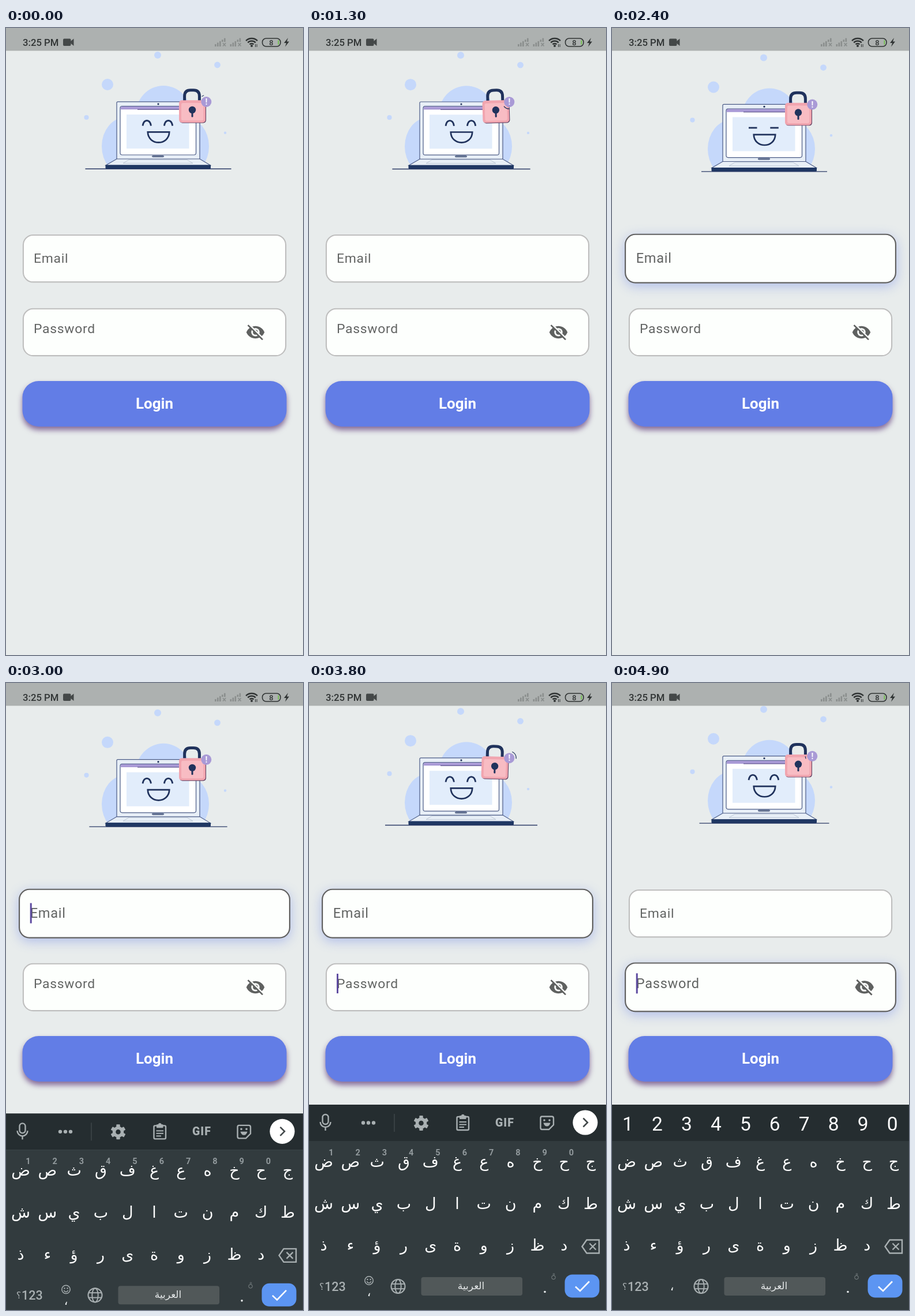
Write an HTML page with a canvas that moves like this. It is 515 px wide and 1087 px high and loops after 5 s.

```html
<!DOCTYPE html>
<html lang="en">
<head>
<meta charset="utf-8">
<title>Login</title>
<style>
html, body { margin: 0; width: 100%; height: 100%; overflow: hidden; background: #e8ecec; }
canvas { display: block; }
</style>
</head>
<body>
<canvas id="stage" width="515" height="1087"></canvas>
<script>
const ctx = document.getElementById('stage').getContext('2d');
const LOOP = 5000, TAU = Math.PI * 2;
const NAVY = '#20325c', BLUE = '#c5d8fb', LILAC = '#a99ad6', INK = '#303434', KEY = '#a9b0b2';
const ROBOTO = 'Roboto, sans-serif', ARABIC = '"DejaVu Sans", sans-serif';

const clamp = (v, a = 0, b = 1) => Math.min(b, Math.max(a, v));
const mix = (a, b, p) => a + (b - a) * p;

function paint(fill, stroke, width = 1) {
  if (fill) { ctx.fillStyle = fill; ctx.fill(); }
  if (stroke) { ctx.strokeStyle = stroke; ctx.lineWidth = width; ctx.stroke(); }
}
function box(x, y, w, h, r, fill, stroke, width) {
  ctx.beginPath();
  ctx.roundRect(x, y, w, h, r);
  paint(fill, stroke, width);
}
function oval(x, y, rx, ry, fill, stroke, width) {
  ctx.beginPath();
  ctx.ellipse(x, y, rx, ry, 0, 0, TAU);
  paint(fill, stroke, width);
}
const dot = (x, y, r, fill, stroke, width) => oval(x, y, r, r, fill, stroke, width);
function arc(x, y, r, from, to, color, width) {
  ctx.beginPath();
  ctx.arc(x, y, r, from, to);
  paint(null, color, width);
}
function poly(points, fill, stroke, width, closed = true) {
  ctx.beginPath();
  for (let i = 0; i < points.length; i += 2) ctx.lineTo(points[i], points[i + 1]);
  if (closed) ctx.closePath();
  paint(fill, stroke, width);
}
const line = (points, color, width) => poly(points, null, color, width, false);
function shape(d, fill, stroke, width) {
  const path = new Path2D(d);
  if (fill) { ctx.fillStyle = fill; ctx.fill(path); }
  if (stroke) { ctx.strokeStyle = stroke; ctx.lineWidth = width; ctx.stroke(path); }
}
function text(s, x, y, font, color, align = 'center', spacing = 0) {
  ctx.font = font;
  ctx.fillStyle = color;
  ctx.textAlign = align;
  ctx.letterSpacing = spacing + 'px';
  ctx.fillText(s, x, y);
}
function at(x, y, draw) {
  ctx.save();
  ctx.translate(x, y);
  draw();
  ctx.restore();
}
function shadow(color, blur, y) {
  ctx.shadowColor = color;
  ctx.shadowBlur = blur;
  ctx.shadowOffsetY = y;
}

function signal(x) {
  const gray = '#8a8e8d';
  for (let i = 0; i < 5; i++) {
    const h = 4 + i * 2.6, cut = i > 2 ? 8 : 0;
    box(x + i * 4, 32 - h, 2.6, h - Math.min(cut, h), 0, gray);
  }
  line([x + 14, 26, x + 19, 31.5], gray, 1.8);
  line([x + 19, 26, x + 14, 31.5], gray, 1.8);
}

function statusBar() {
  box(0, 0, 515, 39.5, 0, '#adb1b0');
  text('3:25 PM', 29, 31, '500 16.7px ' + ROBOTO, INK, 'left');
  box(99, 18.5, 13.5, 12.5, 2, '#444848');
  poly([112, 23, 117.5, 18.5, 117.5, 31, 112, 26.5], '#444848');
  signal(362);
  signal(388.5);
  for (const r of [5, 9.5, 14]) arc(426, 32, r, -TAU * 0.375, -TAU * 0.125, INK, 2.5);
  dot(426, 31, 2, INK);
  line([432.5, 28, 432.5, 33], INK, 1);
  line([435, 28, 435, 33], INK, 1);
  box(444.5, 18, 31.5, 14, 6.5, null, INK, 1.6);
  box(471.5, 21, 1.8, 8, 0.9, '#6fc04a');
  text('8', 460, 29.8, '500 13px ' + ROBOTO, INK);
  poly([489, 17, 482, 26, 486, 26, 484, 32.5, 491, 23.5, 487, 23.5], INK);
}

function eye(x, k) {
  const top = 168.5 - 16 * k;
  shape(`M${x} ${168.5 + k} C${x + 2} ${top + 5 * k} ${x + 12.5} ${top + 5 * k} ${x + 14.5} ${168.5 + k}`, null, NAVY, 2.8);
}

function laptop(m) {
  ctx.save();
  ctx.beginPath();
  ctx.rect(120, 90, 280, 150);
  ctx.clip();
  oval(273, 150, 48, 50, BLUE);
  oval(207, 205, 41, 50, BLUE);
  oval(312, 205, 40, 49, BLUE);
  ctx.restore();

  const edge = '#4b5b86', shell = '#e8eff7';
  box(192, 127.8, 144, 100, 2, shell, edge, 1.2);
  dot(264, 131.8, 1.6, NAVY);
  box(198, 135.5, 131.5, 84.5, 3.5, '#fff', edge, 1.2);
  box(198.6, 136, 130, 5.2, [3, 3, 0, 0], LILAC);
  line([228, 141.2, 302, 141.2], '#4a3f7c', 1);
  box(209, 150, 108.5, 59, 0, '#e2edfb');
  box(253.5, 221.5, 20, 2, 1, '#9aa6bd', NAVY, 0.9);

  const open = clamp(Math.abs(m - 2400) / 200);
  eye(237, open);
  eye(274.3, open);
  shape('M245.8 180.3 H283.2 C282.5 204.5 246.5 204.5 245.8 180.3 Z', null, NAVY, 2.7);

  poly([192, 227, 336, 227, 354.5, 238, 173, 238], shell, edge, 1.1);
  poly([213, 228.5, 314, 228.5, 324, 234.5, 203, 234.5], null, '#b9c4d3', 0.9);
  box(172.5, 237.5, 182.5, 7, [0, 0, 2, 2], '#1f3763');
  const half = Math.max(109, 119 + 13 * Math.cos(TAU * (m - 500) / 3300));
  line([264 - half, 244.3, 264 + half, 244.3], '#2b3a66', 1.4);
}

function padlock(m) {
  const swing = m > 200 && m < 1950 ? 4 * Math.sin(TAU * (m - 1600) / 700) : 0;
  at(322.5, 113, () => {
    ctx.rotate(swing * TAU / 360);
    ctx.translate(-322.5, -113);
    shape('M309.6 127 V118 Q309.6 107.7 320 107.7 H325 Q335.4 107.7 335.4 118 V127', null, NAVY, 5);
    box(301, 126.2, 46, 38.6, 5, '#5a3a5c');
    box(300, 125.3, 46, 38.6, 5, '#f1a5af');
    box(304, 130, 38.5, 30.5, 3, '#f8bcc3');
    dot(323, 142, 6.2, NAVY);
    box(321.5, 145, 3, 9.5, 1, NAVY);
  });
  dot(347.3, 128, 9, LILAC);
  text('!', 347.3, 133, '700 14px ' + ROBOTO, '#fff');
  if (m < 1750) {
    const mid = (-120 + 0.18 * m) * TAU / 360;
    const span = 40 * Math.sin(Math.PI * (m + 150) / 1900) * TAU / 360;
    arc(347.3, 128, 12, mid - span, mid + span, NAVY, 1.3);
  }
}

function hero(t) {
  const m = t % 3300;
  at(0, 1.9 - 3.1 * Math.cos(TAU * (t - 625) / 4300), () => {
    dot(263, 47, 6, BLUE);
    dot(366.5, 64, 5.4, BLUE);
    dot(176, 98, 10, BLUE);
    dot(139.5, 155, 4.1, BLUE);
    dot(380, 181.7, 2.2, BLUE);
    laptop(m);
    padlock(m);
  });
}

function hiddenEye(x, y) {
  const gray = '#5f6160';
  at(x, y, () => {
    shape('M-15.7 0 C-10 -14.3 10 -14.3 15.7 0 C10 14.3 -10 14.3 -15.7 0 Z', gray);
    dot(0, 0, 7.2, '#fdfffd');
    dot(0, 0, 4.3, gray);
    line([-12, -14.5, 15, 12.5], '#fdfffd', 2.8);
    line([-13, -12.3, 12.5, 13], gray, 2.7);
  });
}

function field(label, y, baseline, p, caret, extra) {
  at(257.5, y, () => {
    const s = 1 + 0.03 * p, g = mix(190, 96, p);
    ctx.scale(s, s);
    ctx.save();
    if (p > 0) shadow(`rgba(98,125,230,${0.42 * p})`, 20 * p, 5 * p);
    box(-228.5, -41.5, 457, 83, 18, '#fdfffd');
    ctx.restore();
    box(-227.6, -40.7, 455.2, 81.4, 17, null, `rgb(${g},${g},${g})`, 2.1);
    text(label, -209.5, baseline, '22.9px ' + ROBOTO, '#626463', 'left', 0.72);
    if (caret) box(-209.5, baseline - 25, 2.9, 34, 0, '#5d4aa0');
    if (extra) extra();
  });
}

function form(t) {
  const since = start => clamp((t - start) / 230);
  const blink = start => t >= start && (t - start) % 1000 < 500;
  field('Email', 399.7, 7.4, since(1600) - since(3800), t < 3800 && blink(1600));
  field('Password', 527.4, 1.6, since(3800), blink(3800), () => hiddenEye(175, 0));
  ctx.save();
  shadow('rgba(82,40,110,.65)', 10, 6);
  box(28.5, 612, 458, 79, 28, '#627de6');
  ctx.restore();
  text('Login', 257.5, 660, '700 26px ' + ROBOTO, '#fff');
}

function toolbar() {
  box(23.5, 748, 10, 17, 5, null, KEY, 2.4);
  arc(28.5, 761, 9, 0, Math.PI, KEY, 2.4);
  line([28.5, 770, 28.5, 776], KEY, 2.4);
  for (const x of [94, 103, 112]) dot(x, 762.5, 3.2, KEY);
  line([148, 747, 148, 778], '#41494c', 1.4);
  at(194.5, 763, () => {
    for (let i = 0; i < 6; i++) {
      box(-3.2, -13, 6.4, 8, 1, KEY);
      ctx.rotate(TAU / 6);
    }
    dot(0, 0, 7, null, KEY, 5.5);
  });
  box(256.5, 752, 20.5, 23, 2, null, KEY, 2.4);
  box(261, 750, 11.5, 6, 1, KEY);
  dot(266.8, 750.5, 2.8, KEY);
  line([260.5, 761, 273, 761], KEY, 2);
  line([260.5, 765.5, 273, 765.5], KEY, 2);
  line([260.5, 770, 269, 770], KEY, 2);
  text('GIF', 339.5, 769, '900 19.5px ' + ROBOTO, KEY, 'center', 1);
  shape('M404 751.5 H421 Q424 751.5 424 754.5 V766 L416 774 H404 Q401.5 774 401.5 771 V754.5 Q401.5 751.5 404 751.5 Z', null, KEY, 2.4);
  dot(408, 758, 1.8, KEY);
  dot(417, 758, 1.8, KEY);
  shape('M406.5 762.5 H418.5 Q417 768.5 412.5 768.5 Q408 768.5 406.5 762.5 Z', KEY);
  dot(479, 762, 21.6, '#fff');
  line([475.5, 754.5, 483, 762, 475.5, 769.5], '#43494b', 2.6);
}

function bottomRow(digits) {
  text('؟', 22, 1052, '16px ' + ARABIC, KEY);
  text('123', 27, 1053.5, '500 21.5px ' + ROBOTO, KEY, 'left');
  if (!digits) {
    dot(104, 1036, 7.2, null, KEY, 1.5);
    dot(101.4, 1034, 1.2, KEY);
    dot(106.6, 1034, 1.2, KEY);
    arc(104, 1036.5, 3.7, 0.2, Math.PI - 0.2, KEY, 1.4);
  }
  text('،', 104, digits ? 1053 : 1063, '22px ' + ARABIC, '#e8ebec');
  dot(154.5, 1046, 12, null, KEY, 2.1);
  oval(154.5, 1046, 5.2, 12, null, KEY, 1.9);
  line([143.5, 1041.8, 165.5, 1041.8], KEY, 1.9);
  line([143.5, 1050.2, 165.5, 1050.2], KEY, 1.9);
  box(194.5, 1030, 175.5, 32, 4, '#515859');
  text('العربية', 282, 1051, '17px ' + ARABIC, '#e4e7e8');
  dot(409, 1055.5, 1.8, '#e8ebec');
  dot(424, 1030.5, 3.3, null, '#7d8587', 1);
  dot(424.5, 1025, 1.3, null, '#7d8587', 0.8);
  box(443.5, 1025.5, 60, 40, 13, '#5c95f2');
  line([462, 1046.5, 470, 1054, 486, 1037.5], '#fff', 2.6);
}

function keyboard(t) {
  if (t <= 2750) return;
  const digits = t >= 4100;
  const rows = ['ضصثقفغعهخحج', 'شسيبلاتنمكط', 'ذءؤرىةوزظد'];
  at(0, 356 * (1 - clamp((t - 2750) / 385)) ** 3, () => {
    box(0, 731, 515, 63.5, 0, '#252d30');
    box(0, 794, 515, 293, 0, '#323b3e');
    if (!digits) toolbar();
    [...'1234567890'].forEach((n, i) => {
      if (digits) text(n, 27.5 + 50.95 * i, 775.5, '33.5px ' + ROBOTO, '#fff');
      else text(n, 38.3 + 46.3 * i, 818.5, '700 14.5px ' + ROBOTO, '#929a9d');
    });
    rows.forEach((row, r) => [...row].forEach((c, i) =>
      text(c, 25.5 + 46.3 * i, 839 + 72.7 * r, '27px ' + ARABIC, '#fff')));
    poly([473.5, 977, 481.5, 965.5, 503, 965.5, 503, 988.5, 481.5, 988.5], null, KEY, 2.4);
    line([486.5, 971.5, 497.5, 982.5], KEY, 2.3);
    line([497.5, 971.5, 486.5, 982.5], KEY, 2.3);
    bottomRow(digits);
  });
}

function draw(now) {
  // The picture advances in tenths of a second after a short hold.
  let t = Math.floor((now % LOOP) / 100) * 100;
  if (t < 300) t = 0;
  box(0, 0, 515, 1087, 0, '#e8ecec');
  hero(t);
  statusBar();
  form(t);
  keyboard(t);
}

let start;
function tick(now) {
  start ??= now;
  draw(now - start);
  requestAnimationFrame(tick);
}
draw(0);
requestAnimationFrame(tick);
</script>
</body>
</html>
```
